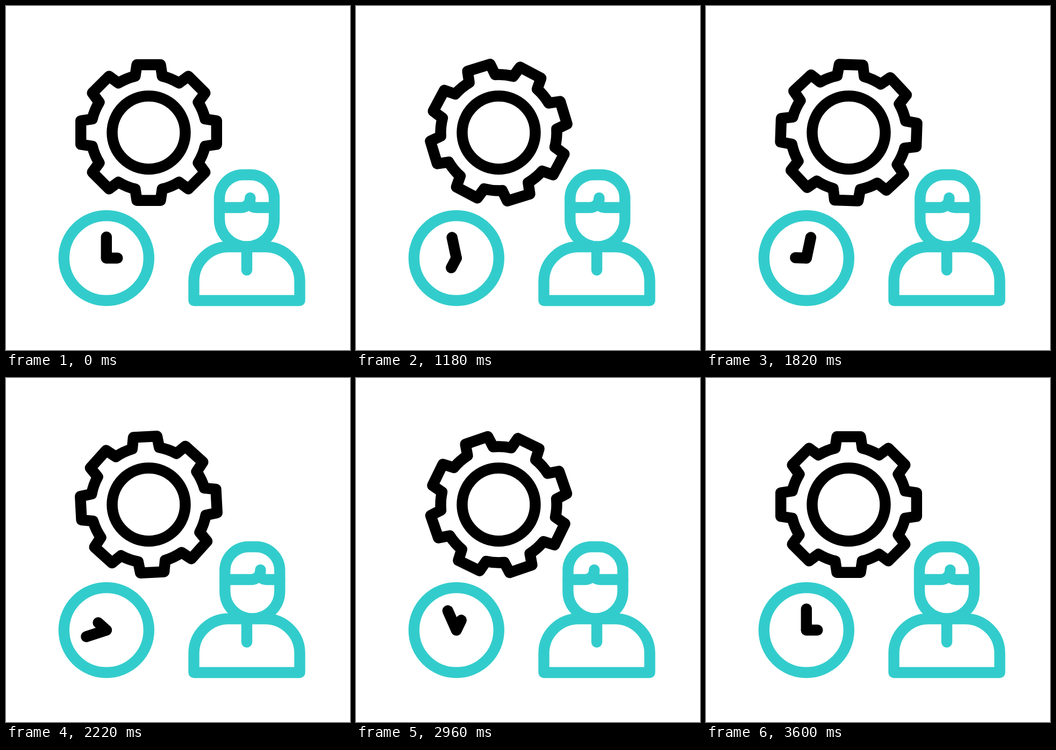
An HTML page with a canvas for the animation above (3.62 s loop, 640x640 px).

```html
<!DOCTYPE html>
<html lang="en">
<head>
<meta charset="utf-8">
<title>Working time</title>
<style>
  html, body { margin: 0; width: 100%; height: 100%; overflow: hidden; background: #fff; }
  canvas { display: block; width: 640px; height: 640px; }
</style>
</head>
<body>
<canvas id="stage" width="640" height="640"></canvas>
<script>
const ctx = document.getElementById('stage').getContext('2d');
const LOOP = 3620, STEP = 20, TURN = 3600;
const BLACK = '#000', TEAL = '#33cccc';
const TAU = Math.PI * 2, DEG = Math.PI / 180;

// The head looks left and right, starting and ending at rest.
const LOOK_TIMES = [0, 300, 900, 1500, 2100, 2700, 3300, 3600];
const HEAD = { rest: 448, left: 435, right: 461 };
const FRINGE = { rest: 454.3, left: 418.8, right: 479.8 };

function look(pose, t) {
  const last = LOOK_TIMES.length - 1;
  const value = i => i === 0 || i === last ? pose.rest : i % 2 ? pose.left : pose.right;
  let i = 0;
  while (i < last - 1 && t >= LOOK_TIMES[i + 1]) i++;
  const u = Math.min(1, (t - LOOK_TIMES[i]) / (LOOK_TIMES[i + 1] - LOOK_TIMES[i]));
  return value(i) + (value(i + 1) - value(i)) * u * u * (3 - 2 * u);
}

function stroke(color, path) {
  ctx.strokeStyle = color;
  ctx.stroke(path instanceof Path2D ? path : new Path2D(path));
}

function ring(color, x, y, r) {
  const path = new Path2D();
  path.arc(x, y, r, 0, TAU);
  stroke(color, path);
}

function makeGear() {
  const path = new Path2D();
  const tip = Math.hypot(22, 126.3), tipHalf = Math.atan2(22, 126.3);
  const rootHalf = 13.5 * DEG;
  for (let i = 0; i < 8; i++) {
    const mid = (i * 45 - 90) * DEG;
    for (const a of [mid - tipHalf, mid + tipHalf]) {
      path.lineTo(tip * Math.cos(a), tip * Math.sin(a));
    }
    path.arc(0, 0, 108, mid + rootHalf, mid + 45 * DEG - rootHalf);
  }
  path.closePath();
  return path;
}
const gear = makeGear();

function drawGear(angle) {
  ctx.save();
  ctx.translate(265.5, 235.5);
  ctx.rotate(angle);
  stroke(BLACK, gear);
  ctx.restore();
  ring(BLACK, 265.5, 235.5, 68);
}

function drawHand(angle, length) {
  ctx.save();
  ctx.translate(186.8, 469);
  ctx.rotate(angle);
  stroke(BLACK, `M0 0V${-length}`);
  ctx.restore();
}

function drawClock(angle) {
  ring(TEAL, 186.8, 469, 79);
  drawHand(angle * 6, 39.4);
  drawHand(angle + TAU / 4, 20.5);
}

function drawPerson(head, fringe) {
  const left = head - 51, right = head + 51;
  stroke(TEAL, 'M349.5 548V512A64.5 64 0 0 1 414 448H482A64.5 64 0 0 1 546.5 512V548Z');
  stroke(TEAL, 'M448 448V491.3');
  stroke(TEAL, `M${left} 358a44 44 0 0 1 44 -44h14a44 44 0 0 1 44 44v38.7a51 51 0 0 1 -102 0Z`);
  stroke(TEAL, `M${left} 375H${fringe - 17}a17 17 0 0 0 17 -17v-1`);
  stroke(TEAL, `M${right} 375H${fringe + 11.5}q-6 0 -11 -4`);
}

function draw(now) {
  const t = Math.floor((now % LOOP) / STEP) * STEP;
  const angle = t / TURN * TAU;
  ctx.fillStyle = '#fff';
  ctx.fillRect(0, 0, 640, 640);
  ctx.lineWidth = 20.4;
  ctx.lineCap = ctx.lineJoin = 'round';
  drawGear(angle);
  drawClock(angle);
  drawPerson(look(HEAD, t), look(FRINGE, t));
}

let start;
function tick(now) {
  start ??= now;
  draw(Math.max(0, now - start));
  requestAnimationFrame(tick);
}
draw(0);
requestAnimationFrame(tick);
</script>
</body>
</html>
```
